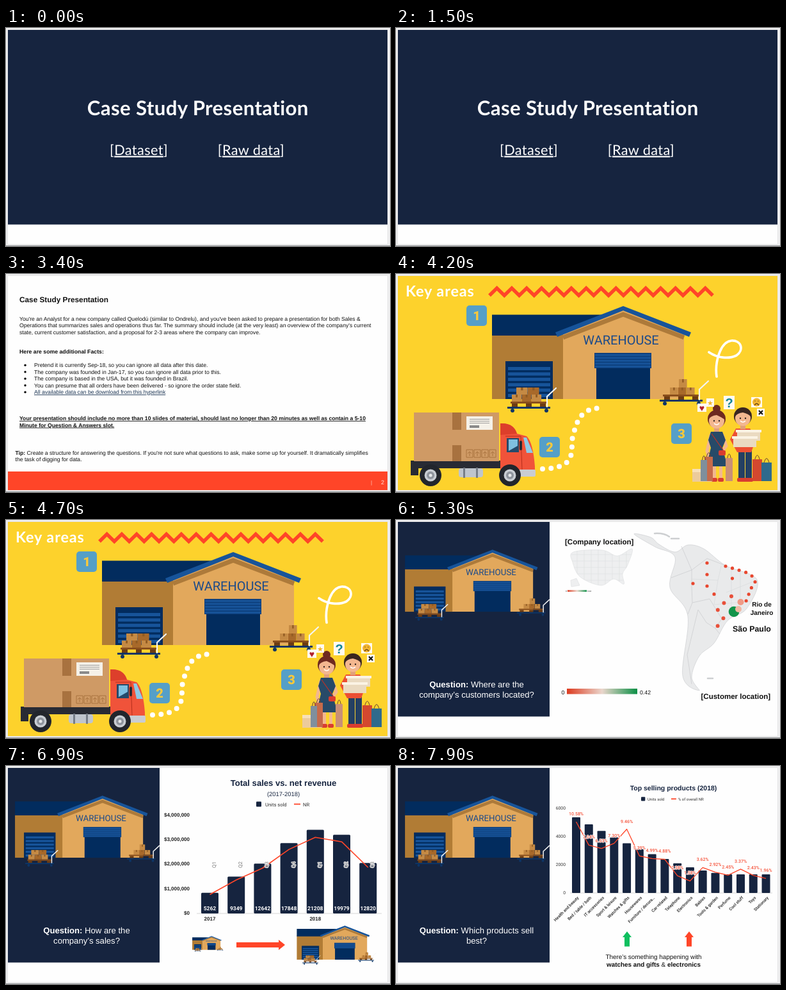
Write an HTML page that moves like this. It is 600 by 340 pixels and loops after 8000 ms.

```html
<!DOCTYPE html>
<html lang="en">
<head>
<meta charset="utf-8">
<title>Case Study Presentation</title>
<style>
html, body { margin: 0; width: 100%; height: 100%; overflow: hidden; background: #efeff0; }
svg { display: block; width: 600px; height: 340px; text-rendering: geometricPrecision; }
text { font-family: "Liberation Sans", Arial, sans-serif; white-space: pre; }
.geo { font-family: Lato, sans-serif; }
.rob { font-family: Roboto, sans-serif; }
.mid { font-weight: 500; }
.b { font-weight: 700; }
.black { font-weight: 900; }
.m { text-anchor: middle; }
.e { text-anchor: end; }
.u { text-decoration: underline; }
.halo { paint-order: stroke; stroke: #fff; stroke-width: 1.6px; stroke-linejoin: round; }
</style>
</head>
<body>
<svg id="stage" viewBox="0 0 600 340"></svg>
<script>
const NAVY = '#16243f', RED = '#ff4528', DEEP = '#022c5e', BLUE = '#17549a', SKIN = '#f3b78f';

const text = (x, y, size, str, cls = '', fill = '#111', more = '') =>
  `<text x="${x}" y="${y}" font-size="${size}" class="${cls}" fill="${fill}" ${more}>${str}</text>`;
const rect = (x, y, w, h, fill, r = 0) =>
  `<rect x="${x}" y="${y}" width="${w}" height="${h}" rx="${r}" fill="${fill}"/>`;
const shape = (d, fill, more = '') => `<path d="${d}" fill="${fill}" ${more}/>`;
const dot = (x, y, r, fill) => `<circle cx="${x}" cy="${y}" r="${r}" fill="${fill}"/>`;
const line = (d, stroke, w, more = '') =>
  `<path d="${d}" fill="none" stroke="${stroke}" stroke-width="${w}" ${more}/>`;
const round = 'stroke-linecap="round" stroke-linejoin="round"';
const beads = (d, size, gap, fill) => line(d, fill, size, `${round} stroke-dasharray="0 ${gap}"`);
const range = (n, f) => Array.from({ length: n }, (_, i) => f(i)).join('');
const bold = s => `<tspan class="b">${s}</tspan>`;
const paper = rect(3, 3, 593, 334, '#fefefe');

// Closed smooth curve through a few points
function smooth(str) {
  const pts = str.split(' ').map(p => p.split(',').map(Number));
  const at = i => pts[(i + pts.length) % pts.length];
  return `M${pts[0]}` + pts.map((a, i) => {
    const b = at(i + 1), before = at(i - 1), after = at(i + 2);
    const out = a.map((v, k) => v + (b[k] - before[k]) / 6);
    const into = b.map((v, k) => v - (after[k] - a[k]) / 6);
    return `C${out} ${into} ${b}`;
  }).join('') + 'Z';
}

// ---- Warehouse -------------------------------------------------------
const crates = (x, y, n, w, h) => range(n, i =>
  rect(x + i * w, y, w - .4, h, i % 2 ? '#a8692a' : '#c58a44') +
  rect(x + i * w + w * .4, y, w * .18, h * .4, '#8f5a22'));

const cart = (x, y, load) => `<g transform="translate(${x} ${y})">` + load +
  rect(5, 23, 58, 3, '#8a4f1c') + range(3, i => rect(7 + i * 22, 26, 9, 5, '#6d3c12')) +
  rect(0, 31, 67, 3, '#0d3566') + dot(8, 37, 3, '#0d3566') + dot(61, 37, 3, '#0d3566') +
  line('M62 31V15L76 2', '#f4f4f4', 2.2, round) + '</g>';

const shutter = (x, y, w, n, step) => range(n, i => rect(x, y + i * step, w, step * .6, BLUE));

const warehouse =
  rect(150, 92, 112, 103, '#b17c35') +
  shape('M150 63.5H322L252 96H150Z', DEEP) +
  shape('M261 195V92L355 56L450 92V195Z', '#e2a85c') +
  line('M261 99L355 63L450 99', '#ad7a3a', 7) +
  shape('M249 91L355 50L461 91L458 98L355 57L252 98Z', BLUE) +
  rect(171, 136, 74, 59, DEEP) + shutter(175, 145, 66, 6, 8.4) +
  rect(313, 140, 84, 55, DEEP) + rect(310, 123, 89, 24, '#0d3f7c') + shutter(311, 125, 87, 5, 4.5) +
  text(351.5, 110, 20, 'WAREHOUSE', 'rob m', '#1b4a8a') +
  cart(174, 176, crates(14, 1, 2, 18, 11) + crates(7, 12, 3, 15.5, 11)) +
  cart(412, 165, crates(30, -1, 1, 13, 13) + crates(16, 12, 3, 13, 11));

const placed = (s, x, y) => `<g transform="translate(${x} ${y}) scale(${s})">${warehouse}</g>`;

const questionSlide = (first, second) =>
  paper + rect(3, 3, 237, 303.5, NAVY) + placed(.667, -86, 13) +
  text(126, 261, 13.1, bold('Question:') + ' ' + first, 'm', '#fff') +
  text(126, 276.5, 13.1, second, 'm', '#fff');

// ---- Title -----------------------------------------------------------
const link = (x, str) =>
  text(x, 197.5, 21.7, `[<tspan class="u">${str}</tspan>]`, 'geo m', '#fff', 'letter-spacing=".4"');
const titleSlide = paper + rect(3, 3, 593, 303.5, NAVY) +
  text(299.8, 136, 31.2, 'Case Study Presentation', 'geo b m', '#fff', 'letter-spacing=".35"') +
  link(207.5, 'Dataset') + link(383, 'Raw data');

// ---- Brief -----------------------------------------------------------
const paragraph = (x, y, step, lines, cls) =>
  lines.map((s, i) => text(x, y + i * step, 8.65, s, cls)).join('');
const facts = [
  'Pretend it is currently Sep-18, so you can ignore all data after this date.',
  'The company was founded in Jan-17, so you can ignore all data prior to this.',
  'The company is based in the USA, but it was founded in Brazil.',
  'You can presume that all orders have been delivered - so ignore the order state field.',
  '<tspan class="u" fill="#1c3554">All available data can be download from this hyperlink</tspan>'];
const briefSlide = paper + rect(3, 308, 593, 29, RED) +
  text(21, 44, 11.8, 'Case Study Presentation', 'b') +
  paragraph(21, 73, 10.4, [
    "You're an Analyst for a new company called Quelodú (similar to Ondrelu), and you've been asked to prepare a presentation for both Sales &amp;",
    "Operations that summarizes sales and operations thus far. The summary should include (at the very least) an overview of the company's current",
    'state, current customer satisfaction, and a proposal for 2-3 areas where the company can improve.']) +
  text(21, 124, 8.72, 'Here are some additional Facts:', 'b') +
  paragraph(44, 145, 10.5, facts) +
  range(facts.length, i => dot(30, 142.2 + i * 10.5, 1.7, '#111')) +
  paragraph(21, 228, 10.6, [
    'Your presentation should include no more than 10 slides of material, should last no longer than 20 minutes as well as contain a 5-10',
    'Minute for Question &amp; Answers slot.'], 'b u') +
  paragraph(14.5, 282, 10.2, [
    bold('Tip:') + " Create a structure for answering the questions. If you're not sure what questions to ask, make some up for yourself. It dramatically simplifies",
    'the task of digging for data.']) +
  text(571, 328, 8, '|', 'm', '#ffd0c4') + text(588.5, 328, 9, '2', 'm', '#ffe4dc');

// ---- Key areas -------------------------------------------------------
const badge = (x, y, n) => rect(x, y, 32, 32, '#559fc8', 5) +
  text(x + 16, y + 23, 20, n, 'rob black m', '#fbc93a');
const wheel = x => dot(x, 314, 17, '#22252c') + dot(x, 314, 9.5, '#c9cdd3') +
  dot(x, 314, 6, '#8f949d') + dot(x, 314, 2.5, '#e6e8ea');

const truck =
  rect(23, 291, 145, 12, '#282b34') + rect(23, 300, 12, 14, '#282b34') +
  rect(28, 216, 133, 76, '#cf9a65') +
  rect(88, 216, 14, 27, '#a8723f') + rect(88, 267, 14, 25, '#a8723f') +
  rect(110, 222, 41, 21, '#f5f1e8') + range(3, i => rect(115, 226 + i * 3, 31, 1, '#9b9b9b')) +
  rect(115, 236, 15, 4, '#8a8a8a') +
  range(4, i => line(`M${110 + i * 12} 274h10v12h-10zm5 10v-7m-3 3l3-3l3 3`, '#a8723f', 1)) +
  shape('M163 312V233Q184 232 189 249L204 253Q214 262 217 300V312Z', '#f0533a') +
  shape('M163 251V233Q184 232 189 249Z', '#dd3f2b') +
  shape('M173 256H192V278H173Z', '#254a6b') + shape('M176 258H190V268L176 276Z', '#7fbfe0') +
  shape('M199 255H204L214 279H204Z', '#8fc9e5') + line('M171 253H195L197 306', '#b52f1d', 1) +
  rect(193, 260, 4, 15, '#272a32', 2) + rect(192, 305, 26, 11, '#c9ccd2', 2) +
  rect(98, 303, 38, 14, '#bfc5cd', 4) + range(2, i => rect(105 + i * 20, 302, 3, 16, '#777e88')) +
  wheel(54) + wheel(178);

const GROUND = 323;
const bag = (x, w, h, fill) => rect(x, GROUND - h, w, h, fill) +
  line(`M${x + w / 4} ${GROUND - h}q${w / 4} -13 ${w / 2} 0`, '#684434', 1);
const head = (x, y, hair, fringe) =>
  dot(x, y - 3, 14, hair) + rect(x - 4, y + 7, 8, 10, '#e2a07a') + dot(x, y, 12, SKIN) +
  shape(`M${x - 13} ${y - 2}q3 -14 13 -14t13 14q${fringe} -5 -13 -7q-9 1 -13 7z`, hair) +
  [-4, 4].map(d => dot(x + d, y, 1.2, '#332320')).join('') +
  line(`M${x - 4} ${y + 4}q4 4 8 0`, '#fff', 1.6);
const legs = (x, y, w, gap, fill) => [x, x + gap].map(k =>
  rect(k, y, w, 320 - y, fill) + rect(k - 2, 318, w + 4, 6, '#d93d30', 2)).join('');

const woman = dot(501, 210, 6, '#6e2a20') + legs(495, 292, 5, 10, SKIN) +
  line('M492 251L486 276L490 288M510 251L516 268L509 278', SKIN, 5, round) +
  shape('M492 246H510L515 259L510 271L518 300H485L492 271L488 259Z', '#274a68') +
  head(501, 229, '#6e2a20', -8) +
  line('M493 249L512 276', '#b7332b', 1.2) + rect(504, 275, 11, 8, '#d93d30', 2);

const man = legs(535, 274, 10, 11, '#243f63') +
  shape('M531 241H553L563 256L555 278H533L522 258Z', '#ec4f33') + head(542, 225, '#3a2620', -4) +
  range(2, i => rect(533 - i * 6, 244 + i * 10, 36, 16, '#eadac1') +
    rect(531 - i * 6, 243 + i * 10, 40, 4, '#fbf3e4'));

const card = (x, y, w, h) => rect(x, y, w, h, '#fffaf2');
const reactions =
  card(471, 202, 14, 13) + text(478, 213.5, 14, '♥', 'm', '#b3202c') +
  card(485, 194, 12, 13) + text(491, 204.5, 11, '★', 'm', '#f2b532') +
  card(512, 190, 17, 21) + text(520.5, 208, 20, '?', 'b m', '#12869a') +
  card(555, 192, 17, 16) + dot(563.5, 200, 6.5, '#f2b431') +
  line('M561 198v.1m5 0v.1m-5.5 6q3-4 6 0', '#5b3911', 1.3, round) +
  card(564, 210, 12, 12) + line('M567 213l6 6m0-6l-6 6', '#111', 2.2);

const zigzag = 'M' + Array.from({ length: 31 }, (_, i) =>
  [146 + i * 11.63, i % 2 ? 22 : 33.5]).join('L');

const areasSlide = rect(3, 3, 593, 334, '#fdd22c') +
  text(15, 34.5, 23.4, 'Key areas', 'geo b', '#fff', 'letter-spacing=".9"') +
  line(zigzag, RED, 5.5) + warehouse + truck +
  beads('M229 304C289 302 270 272 277 250S288 209 322 209', 8, 13.2, '#fff') +
  badge(110, 49, 1) + badge(224, 254, 2) + badge(430, 233, 3) +
  line('M501 160C498 139 506 106 524 104C540 103 544 119 532 127C520 133 502 131 489 122', '#fff', 3.7, round) +
  rect(463, 304, 34, 20, '#eccb9b') + rect(463, 304, 34, 5, '#f7e0b9') + man + woman +
  bag(482, 13, 38, '#c66a4a') + bag(476, 10, 33, '#7f8f9c') + bag(515, 11, 36, '#c98f78') +
  bag(557, 15, 34, '#d4482f') + bag(571, 16, 29, '#2f6a8c') + reactions;

// ---- Customer map ----------------------------------------------------
const LAND = '#e9eaeb', EDGE = '#cdcfd1', FAINT = '#dcdee0';

const america = shape(smooth('372,22 398,27 411,38 436,50 456,39 481,45 515,71 564,93 548,138 518,157 497,192 474,212 462,245 474,266 448,243 456,150 428,105 436,58 405,42'),
  LAND, `stroke="${EDGE}" stroke-width=".7"`) +
  line('M404 21Q418 20 427 26M430 29h12M487 247h8', EDGE, 2.5, round) +
  line('M446 41L462 78V103L463 129L490 123L509 154L499 169L506 178M430 90L462 78L486 60L515 71M463 129L456 147M472 140L455 210L462 256M499 169L485 160L472 140', EDGE, .8) +
  line('M462 92L503 94L508 72M503 94L497 132M524 145V78M538 80V122M497 132L553 127M516 113L563 94', '#d6d8da', .6);

const usOutline = smooth('277,50 322,47 346,56 369,45 362,70 354,84 356,100 340,92 320,102 288,89 276,66');
const usa = `<clipPath id="us"><path d="${usOutline}"/></clipPath>` +
  shape(usOutline, '#eeeff0', `stroke="${FAINT}" stroke-width=".6"`) +
  line(range(8, i => `M${283 + i * 11} 44V104M274 ${54 + i * 10}H372`), FAINT, .6, 'clip-path="url(#us)"') +
  shape('M273 94L282 91L287 102L274 104Z', '#eeeff0', `stroke="${FAINT}" stroke-width=".6"`);

const heat = '<defs><linearGradient id="heat"><stop stop-color="#dd3a1f"/><stop offset=".5" stop-color="#ead6cc"/><stop offset="1" stop-color="#0b8f45"/></linearGradient></defs>';
const scale = (x, y, w, h, size) => rect(x, y, w, h, 'url(#heat)') +
  text(x - size * .4, y + h, size, '0', 'e') + text(x + w + size * .45, y + h, size, '0.42');

const mapSlide = questionSlide('Where are the', 'company’s customers located?') +
  heat + usa + america +
  beads('M515 72L545 81Q571 92 555 106L544 134', 5.2, 11, '#e8472f') +
  beads('M486 67V107L500 118', 5.2, 18, '#e8472f') + beads('M464 99L526 91L541 87', 5.2, 62, '#e8472f') +
  beads('M524 119L502 139L512 154L502 166', 6, 15.6, '#e8503a') +
  dot(528, 143, 8.3, '#12944a') + dot(538.5, 128, 5, '#f09a86') + dot(535, 139, 5, '#f0b9a4') +
  text(264, 38, 11.5, '[Company location]', 'b') + text(476.5, 279, 11.5, '[Customer location]', 'b') +
  text(571.5, 135, 10, 'Rio de', 'b m') + text(571.5, 147.5, 10, 'Janeiro', 'b m') +
  text(526, 174, 12.4, 'São Paulo', 'b') +
  scale(268, 109.3, 30, 2.6, 3) + scale(267, 263, 110, 8.5, 8.8);

// ---- Sales -----------------------------------------------------------
const legend = (x, y, s, nameX, lineX, series) =>
  rect(x, y - s, s, s, NAVY, 1) + text(nameX, y - .5, s * .95, 'Units sold', 'rob', '#333') +
  line(`M${lineX} ${y - s / 2}h${s * 1.25}`, RED, 1.8) +
  text(lineX + s * 1.75, y - .5, s * .95, series, 'rob', '#333');
const graph = (values, fx, fy, w) =>
  line('M' + values.map((v, i) => [fx(i), fy(v)]).join('L'), RED, w, 'stroke-linejoin="round"');

const units = [5262, 9349, 12642, 17848, 21208, 19979, 12820];
const barX = i => 318.5 + i * 41.2;
const barY = n => 230 - n * .00615;

const salesSlide = questionSlide('How are the', 'company’s sales?') +
  text(433.5, 31, 13.1, 'Total sales vs. net revenue', 'b m', NAVY) +
  text(433.5, 47, 9.4, '(2017-2018)', 'm', NAVY) +
  legend(391, 63.5, 8, 405, 450, 'NR') +
  range(5, i => text(287, 78.5 + i * 38.4, 8, i < 4 ? `$${4 - i},000,000` : '$0', 'b e', '#222')) +
  line('M298 230H587', '#ccc', .8) +
  units.map((n, i) => rect(barX(i) - 13.5, barY(n), 27, 230 - barY(n), NAVY, 1.5)).join('') +
  graph(units, barX, n => barY(n * .91), 1.6) +
  units.map((n, i) =>
    text(0, 0, 8, 'Q' + (i % 4 + 1), 'rob m halo', '#777',
      `transform="translate(${barX(i) + 9.5} 154) rotate(-90)"`) +
    text(barX(i), 225, 8.5, n, 'rob b m', '#fff')).join('') +
  [2017, 2018].map((year, i) => text(barX(i * 4), 240.5, 8, year, 'b m', '#222')).join('') +
  placed(.147, 269, 258) + placed(.366, 399.5, 230.7) +
  shape('M360 275H426V271L436 279L426 287V283H360Z', RED);

// ---- Products --------------------------------------------------------
const products = ['Health and beauty', 'Bed / table / bath', 'IT accessories', 'Sport &amp; leisure',
  'Watches &amp; gifts', 'Housewares', 'Furniture / decora…', 'Car-related', 'Telephone', 'Electronics',
  'Babies', 'Tools &amp; garden', 'Perfume', 'Cool stuff', 'Toys', 'Stationary'];
const shares = '10.58 7.04 6.53 7.30 9.46 5.39 4.99 4.88 2.38 1.58 3.62 2.92 2.45 3.37 2.43 1.96'.split(' ');
const prodX = i => 281.5 + i * 19.77;
const prodHeight = i => 29 + 89 * Math.max(0, 1 - i / 12) ** 1.5;
const shareY = p => 195.5 - p * 10.25;
const upArrow = (x, fill) => shape(`M${x} 258l7 9h-3v14.5h-8v-14.5h-3z`, fill);

const productsSlide = questionSlide('Which products sell', 'best?') +
  text(433.5, 38, 10.5, 'Top selling products (2018)', 'b m', NAVY) +
  legend(383, 54.5, 6.3, 393, 430, '% of overall NR') +
  range(4, i => text(265, 68 + i * 44, 6.8, 6000 - i * 2000, 'rob e', '#333')) +
  line('M272 198H588', '#ccc', .8) +
  range(16, i => rect(prodX(i) - 6.5, 198 - prodHeight(i), 13, prodHeight(i), NAVY, 1)) +
  graph(shares, prodX, shareY, 1.3) +
  products.map((name, i) =>
    text(prodX(i), shareY(shares[i]) - 10, 7, shares[i] + '%', 'rob mid m halo', '#f4543c') +
    text(0, 0, 6.4, name, 'rob mid e', '#222',
      `transform="translate(${prodX(i) + 4.5} 206) rotate(-45)"`)).join('') +
  upArrow(361, '#0fbf5f') + upArrow(458, RED) +
  text(402.5, 301, 9.9, 'There’s something happening with', 'm') +
  text(402.5, 313, 9.9, bold('watches and gifts') + ' &amp; ' + bold('electronics'), 'm');

// ---- Playback --------------------------------------------------------
const LOOP = 8000;
const show = [[0, titleSlide], [2000, briefSlide], [4200, areasSlide],
  [5100, mapSlide], [6700, salesSlide], [7600, productsSlide]];

const stage = document.getElementById('stage');
stage.innerHTML = rect(0, 0, 600, 340, '#efeff0') + rect(2.5, 2.5, 594, 335, '#d9dadc') +
  rect(0, 339, 600, 1, '#97999c') +
  show.map(([, art]) => `<g class="slide" visibility="hidden">${art}</g>`).join('');
const slides = [...stage.querySelectorAll('.slide')];
const start = performance.now();

function draw() {
  const t = (performance.now() - start) % LOOP;
  const current = show.filter(([from]) => from <= t).length - 1;
  slides.forEach((s, i) => s.setAttribute('visibility', i === current ? 'visible' : 'hidden'));
  requestAnimationFrame(draw);
}
draw();
</script>
</body>
</html>
```
